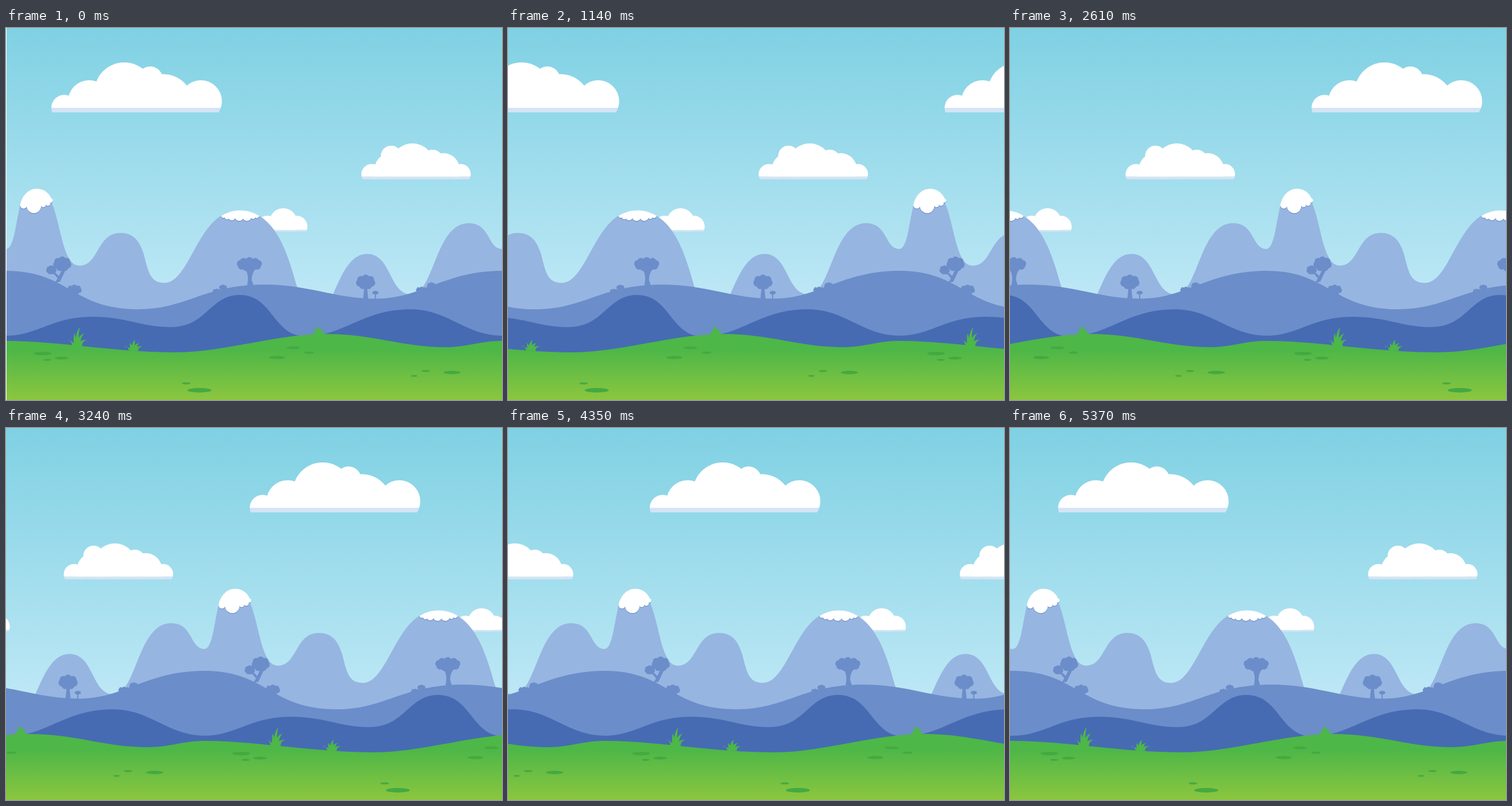
An HTML page that plays this animation: 864 px wide and 648 px high, repeating every 5.4 s.

```html
<!DOCTYPE html>
<html lang="en">
<head>
<meta charset="utf-8">
<title>Rolling hills</title>
<style>
html, body { margin: 0; width: 100%; height: 100%; overflow: hidden; }
svg { display: block; width: 864px; height: 648px; }
</style>
</head>
<body>
<svg id="stage" viewBox="0 0 864 648" xmlns="http://www.w3.org/2000/svg"></svg>
<script>
const WIDTH = 864, LOOP = 5400, STEP = 30;
const FAR = '#97b5e1', MID = '#6b8dc9', NEAR = '#466bb3', GRASS = '#4db748';

const path = (d, fill) => `<path d="${d}" fill="${fill}"/>`;
const ellipse = (x, y, rx, ry = rx) => `<ellipse cx="${x}" cy="${y}" rx="${rx}" ry="${ry}"/>`;
const repeat = (count, make) => Array.from({ length: count }, (_, i) => make(i)).join('');
const gradient = (id, y1, y2, from, to) =>
  `<linearGradient id="${id}" gradientUnits="userSpaceOnUse" x1="0" x2="0" y1="${y1}" y2="${y2}">` +
  `<stop stop-color="${from}"/><stop offset="1" stop-color="${to}"/></linearGradient>`;

// Each layer is laid down twice so that the strip wraps without a seam.
const twice = s => `<g>${s}</g><g transform="translate(${WIDTH})">${s}</g>`;

// Round puffs cut off flat at the base, with a shaded rim of the given depth.
function cloud(base, depth, ...puffs) {
  const left = puffs[0], right = puffs[puffs.length - 1];
  const shape = puffs.map(p => ellipse(...p)).join('') +
    `<rect x="${left[0]}" y="${left[1]}" width="${right[0] - left[0]}" height="${base - left[1]}"/>`;
  const cut = (bottom, fill) =>
    `<clipPath id="cut${bottom}"><rect width="${WIDTH}" height="${bottom}"/></clipPath>` +
    `<g fill="${fill}" clip-path="url(#cut${bottom})">${shape}</g>`;
  return cut(base, '#d4e4f5') + cut(base - depth, '#fff');
}

// A smooth top edge closed by a scalloped lower edge running right to left.
function snowcap(top, roundness, ...points) {
  let d = top;
  for (let i = 1; i < points.length; i++) {
    const [x0, y0] = points[i - 1], [x, y] = points[i];
    const r = roundness * Math.hypot(x - x0, y - y0);
    d += `A${r} ${r} 0 0 1 ${x} ${y}`;
  }
  return `<g transform="translate(0 1.3)">${path(d, MID)}</g>` + path(d, '#fff');
}

// Foliage: a ring of lobes around an oval core.
function clump(x, y, rx, ry, lobes = 7) {
  const r = Math.min(rx, ry) * .5, w = rx - r, h = ry - r;
  return ellipse(x, y, w + r * .4, h + r * .4) + repeat(lobes, i => {
    const a = (i / lobes - .25) * 2 * Math.PI;
    return ellipse(x + w * Math.cos(a), y + h * Math.sin(a), r);
  });
}

// Blades fan out from one root; the outer ones are shorter and droop.
function tuft(x, y, spread, height, lean, blades = 5) {
  return repeat(blades, i => {
    const u = 2 * i / (blades - 1) - 1;
    const tipX = x + u * spread + lean * (1 - u * u);
    const tipY = y - height * (1 - .65 * Math.abs(u));
    const rootX = x + u * 5, bendX = x + u * spread * .4 - 2, bendY = (tipY * 3 + y) / 4 - 4 * Math.abs(u);
    return `M${rootX - 3.5} ${y}Q${bendX - 1.5} ${bendY} ${tipX} ${tipY}` +
      `Q${bendX + 3} ${bendY + 3} ${rootX + 3.5} ${y + 2}Z`;
  });
}

const spot = (x, y, rx) => ellipse(x, y, rx, .6 + rx * .16);

const mountains =
  'M0 385C14 384 16 345 25 307C30 288 42 280 53 280C98 280 88 414 128 414' +
  'C162 414 158 357 199 357C226 357 234 376 240 394C248 425 251 444 276 444' +
  'C322 444 334 318 405 318C466 318 488 382 507 451V500H0Z' +
  'M568 468C585 428 600 393.5 629 393.5C672 393.5 667 464 706 464C746 464 747 340 806 340' +
  'C845 340 838 385 865 385V500H568Z';
const midHills =
  'M0 423C110 423 115 490 230 490C315 490 345 447 450 447C530 447 572 471.5 645 471.5' +
  'C725 471.5 762 423 865 423V600H0Z';
const nearHills =
  'M0 536C55 536 80 503 150 503C210 503 235 521 287 521C350 521 355 465 407 465' +
  'C465 465 465 536 520 537C590 537 620 490 705 490C770 490 800 536 865 536V600H0Z';
const ground =
  'M0 545C90 545 190 565 295 565C380 565 470 533 557 533C640 533 690 556 765 556' +
  'C805 556 825 545 865 545V650H0Z';

const trunks =
  'M85 444L90 436L83 428L86 426L92 432L98 420L104 421L94 442Z' +
  'M420 448Q424 432 417 420L434 420Q428 428 428 439L431 448Z' +
  'M622 473L624 452H629L631 473ZM642.5 473V460H644.5V473Z';
const foliage =
  clump(79, 421.5, 9, 8) + clump(98, 411, 16, 13) + clump(119, 456, 13, 9) +
  clump(424, 411.5, 22, 12.5, 9) + clump(367, 458, 7, 4) + clump(378, 452, 7, 5) +
  clump(626.5, 442.5, 17, 13) + clump(643.5, 461, 5.5, 3.5) +
  clump(724, 456, 10, 5.5) + clump(741, 450, 8, 7);

const layers = [
  cloud(147, 8, [101.5, 139, 22.5], [145, 128, 37], [206, 112, 52], [251, 89, 22], [274, 133, 52.5], [339.5, 127.5, 36.5]) +
  cloud(263.5, 5, [637, 255, 18], [670, 246, 28], [671, 223, 18], [708, 239, 38], [743, 230, 18], [762, 246, 28], [792, 254.5, 17.5]) +
  cloud(354.5, 3, [455, 345, 18], [483, 338, 24], [506, 346, 19]),
  path(mountains, FAR),
  snowcap('M25 306C30 288 42 280 53 280C67 280 75 288 79 297', .5,
    [79, 297], [77, 304], [69, 307], [61, 309], [36, 311], [25, 306]) +
  snowcap('M375 327C394 314.5 421 314.5 441 327', .55,
    [441, 327], [434, 330], [427, 331], [413, 332], [399, 331], [388, 332], [381, 330], [375, 327]),
  path(midHills, MID) + `<g fill="${MID}">${foliage}</g>` + path(trunks, MID),
  path(nearHills, NEAR),
  path(tuft(124, 555, 17, 34, 5) + tuft(222, 561, 16.5, 18, 3) + tuft(544, 535, 13, 18, 0), GRASS),
  path(ground, 'url(#meadow)'),
  '<g fill="#45a941">' +
    spot(64, 567, 15.5) + spot(97, 575, 12) + spot(72, 578, 7) +
    spot(472, 574, 14) + spot(500, 557, 12) + spot(528, 565.5, 8.5) +
    spot(337, 631, 21) + spot(314, 619, 7.5) +
    spot(777, 600, 15) + spot(731, 597.5, 7.5) + spot(711, 606, 5.5) + '</g>'
];

document.getElementById('stage').innerHTML =
  '<defs>' + gradient('sky', 0, 460, '#7fd1e3', '#bce7f5') +
  gradient('meadow', 560, 648, GRASS, '#8cc63f') + '</defs>' +
  '<rect width="864" height="648" fill="url(#sky)"/>' +
  `<g id="strip">${layers.map(twice).join('')}</g>` +
  '<rect id="edge" width="1" height="648" fill="#fff"/>';

const strip = document.getElementById('strip');
const edge = document.getElementById('edge');

function draw(time) {
  const step = Math.floor((time % LOOP) / STEP);
  strip.setAttribute('transform', `translate(${-step * WIDTH * STEP / LOOP})`);
  edge.setAttribute('visibility', step ? 'hidden' : 'visible');
}

const start = performance.now();
function tick() {
  draw(performance.now() - start);
  requestAnimationFrame(tick);
}
draw(0);
requestAnimationFrame(tick);
</script>
</body>
</html>
```
